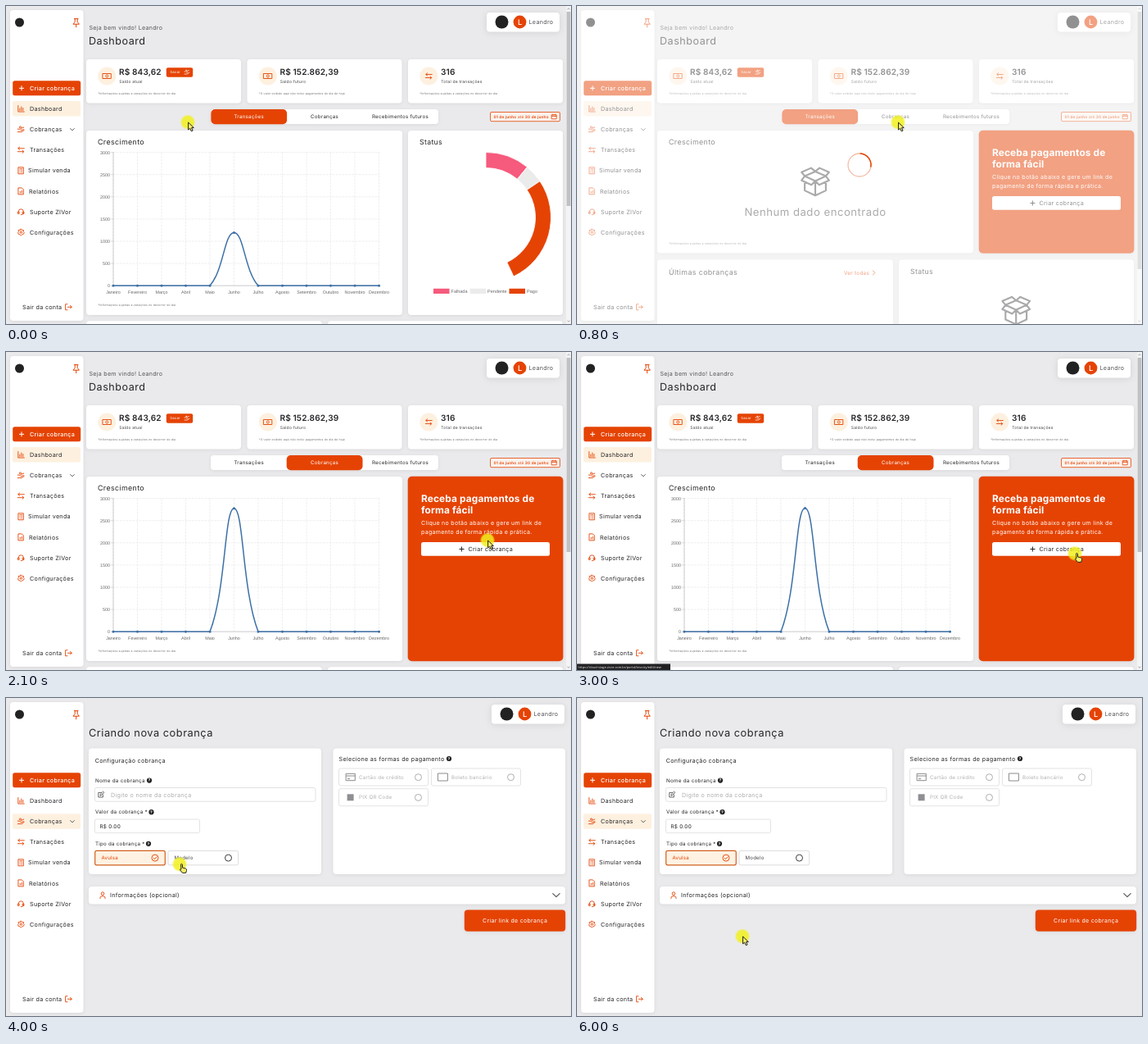
An HTML page for the animation above (6.2 s loop, 690 px wide and 388 px high).

```html
<!DOCTYPE html>
<html lang="pt-BR">
<head>
<meta charset="utf-8">
<title>Painel de cobranças</title>
<style>
html, body { margin: 0; width: 100%; height: 100%; overflow: hidden; background: #eaeaec; }
svg { display: block; width: 690px; height: 388px; }
text { font-family: Inter, "Open Sans", sans-serif; letter-spacing: .04em; white-space: pre; text-rendering: geometricPrecision; }
.big { letter-spacing: .01em; }
.axis { font-family: "Liberation Sans", Arial, sans-serif; letter-spacing: 0; }
.url { font-family: "Open Sans", sans-serif; letter-spacing: 0; }
.card { filter: drop-shadow(0 1px 2px rgba(0, 0, 0, .07)); }
.float { filter: drop-shadow(0 1px 4px rgba(0, 0, 0, .1)); }
</style>
</head>
<body>
<svg id="stage" viewBox="0 0 690 388"></svg>
<script>
const LOOP = 6200, STEP = 100;
const ORANGE = '#e54304', DARK = '#26262a', GREY = '#55555a', CREAM = '#fdf0df', BLUE = '#3d70a6';
const USER = 'Leandro', BRAND = 'ZIVor';

// ---- markup helpers ----
const text = (x, y, size, str, fill = DARK, more = '') =>
  `<text x="${x}" y="${y}" font-size="${size}" fill="${fill}" ${more}>${str}</text>`;
const rect = (x, y, x2, y2, r, fill = '#fff', more = '') =>
  `<rect x="${x}" y="${y}" width="${x2 - x}" height="${y2 - y}" rx="${r}" fill="${fill}" ${more}/>`;
const card = (x, y, x2, y2, more = '') => rect(x, y, x2, y2, 4, '#fff', 'class="card" ' + more);
const circle = (x, y, r, fill, more = '') => `<circle cx="${x}" cy="${y}" r="${r}" fill="${fill}" ${more}/>`;
const ring = (x, y, r, c = ORANGE, w = .9) => circle(x, y, r, 'none', `stroke="${c}" stroke-width="${w}"`);
const line = (d, stroke = ORANGE, w = .9, more = '') =>
  `<path d="${d}" fill="none" stroke="${stroke}" stroke-width="${w}" stroke-linecap="round" stroke-linejoin="round" ${more}/>`;
const group = (id, body) => `<g id="${id}">${body}</g>`;
const at = (x, y, body, scale = 1) => `<g transform="translate(${x} ${y}) scale(${scale})">${body}</g>`;
const plus = (x, y, c) => line(`M${x - 2.6} ${y}h5.2M${x} ${y - 2.6}v5.2`, c, 1);
const MID = 'text-anchor="middle"';
const NOTE = '*Informações sujeitas a variações no decorrer do dia';
const note = (x, y, str = NOTE) => text(x, y, 3.5, str, '#707074');

// icons live in an 8 x 8 box
const icon = {
  bars: line('M.5 0V7.5H8M2.5 6V3.5M4.5 6V1.5M6.5 6V3'),
  hand: line('M0 3.5H2L4 5H5.5M0 7H5L8 4.6L6.5 4L5 5.2M4.2 2.8L7.4 1.4') + ring(3.2, 1.3, 1.1),
  swap: line('M8 2H.5L2.3 .3M.5 2L2.3 3.7M0 6H7.5L5.7 4.3M7.5 6L5.7 7.7'),
  calc: line('M1 0H7V8H1ZM2.5 2H5.5M2.6 4h.1M4 4h.1M5.4 4h.1M2.6 6h.1M4 6h.1M5.4 6h.1'),
  doc: line('M1 0H5L7 2V8H1ZM3 6.2V4.5M5 6.2V3.5'),
  headset: line('M1 4.6V3.8a3 3 0 0 1 6 0V6.5L5 7.6H4M.4 4.2H1.8V6.4H.4ZM6.2 4.2H7.6V6.4H6.2Z'),
  gear: ring(4, 4, 1.2) +
    line('M4 0L5 1.2L7.2 1.4L7 3.4L7.9 4.6L6.8 6.4L5.2 6.8L4 8L2.8 6.8L1 6.4L.3 4.6L1 3.4L.8 1.4L3 1.2Z'),
  cash: line('M-1 1H9V7H-1Z') + ring(4, 4, 1.5),
  box: line('M1 2.4L4 1.1L7 2.4L4 3.8ZM1 2.4L.1 1.3L2.8 .1L4 1.1L5.2 .1L7.9 1.3L7 2.4M1 2.4L.1 3.6L2.9 4.9L4 3.8L5.1 4.9L7.9 3.6L7 2.4' +
    'M1 4.1V6.5L4 7.9L7 6.5V4.1M4 3.8V7.9', GREY, .5)
};

// ---- sidebar ----
const NAV = [['bars', 'Dashboard', 29], ['hand', 'Cobranças', 29], ['swap', 'Transações', 29], ['calc', 'Simular venda', 27],
  ['doc', 'Relatórios', 28], ['headset', 'Suporte ' + BRAND, 29], ['gear', 'Configurações', 29]];
const sidebar = card(5, 5, 94.5, 384) + circle(16.5, 20, 5.5, '#222') +
  line('M83.4 15.6h4.6M84.2 15.8v3.6L82 22.2h7.4L87.2 19.4v-3.6M85.7 22.4v3.4', ORANGE, 1) +
  rect(8.2, 91.2, 91.2, 109.2, 2.5, ORANGE) + plus(19, 100.3, '#fff') +
  text(29, 102.9, 7.2, 'Criar cobrança', '#fff', 'font-weight="500"') +
  rect(8, 116, 91, 134.5, 2, CREAM, 'id="active"') +
  NAV.map(([name, label, x], i) => {
    const y = 125.5 + i * 25.1;
    return at(14.3, y - 4, icon[name]) + text(x, y + 2.6, 7.2, label);
  }).join('') +
  line('M78.6 149.6l2.4 2.2l2.4-2.2', GREY) +
  text(20, 370, 7.2, 'Sair da conta') + line('M75 363.8h-2.4v7H75M75.4 367.3h4.8l-1.8-1.9m1.8 1.9l-1.8 1.9');

const user = rect(587, 8, 676, 31.5, 4, '#fff', 'class="float"') + circle(605.5, 19.5, 8, '#222') + circle(627.5, 19.5, 7.9, ORANGE) +
  text(627.7, 22.9, 9.2, USER[0], '#fff', MID + ' font-weight="500"') + text(638.5, 22.1, 7.2, USER, GREY);

// ---- dashboard ----
function stat(x, glyph, value, label, foot) {
  return card(x, 65, x + 189, 118.5) + circle(x + 25.3, 85.5, 11, CREAM) + at(x + 21.3, 81.5, icon[glyph]) +
    text(x + 40, 84.1, 10.1, value, DARK, 'class="big" font-weight="600"') +
    text(x + 40.3, 94, 5, label, '#444448') + note(x + 14.3, 107.6, foot);
}
const stats = stat(98, 'cash', 'R$ 843,62', 'Saldo atual') +
  stat(294.5, 'cash', 'R$ 152.862,39', 'Saldo futuro', '*O valor exibido aqui não inclui pagamentos do dia de hoje') +
  stat(491, 'swap', '316', 'Total de transações') +
  rect(195.8, 75.3, 228.2, 86.7, 2, ORANGE) + text(200.3, 82.4, 4.3, 'Sacar', '#fff') +
  line('M218 80h1.5l1.5 1.2h1M218 83h3.6l2.4-1.9M221 79.5l2.4-1', '#fff', .7) + circle(220.2, 78.6, .8, '#fff');

const TABS = ['Transações', 'Cobranças', 'Recebimentos futuros'];
const tabs = card(250, 126, 528, 144) + rect(250.3, 126, 343.1, 144.2, 5, ORANGE, 'id="tab"') +
  TABS.map((s, i) => text(296.7 + i * 92.4, 137.4, 6.2, s, DARK, `${MID} id="tab${i}"`)).join('');
const dates = rect(591.5, 129.5, 676.5, 140.7, 1.5, '#faf3ee', `stroke="${ORANGE}" stroke-width=".8"`) +
  text(595.5, 136.9, 4.7, '<tspan font-weight="600">01 de junho</tspan> até <tspan font-weight="600">30 de junho</tspan>', ORANGE) +
  line('M666.6 132.8h5.6v5h-5.6zM666.6 134.4h5.6M668 132v1M670.8 132v1', ORANGE, .8);

const MONTHS = 'Janeiro Fevereiro Março Abril Maio Junho Julho Agosto Setembro Outubro Novembro Dezembro'.split(' ');
const X0 = 131, Y0 = 341.2, DX = 29.5, PX = 162.6 / 3000, PEAK = 2780;
const mx = i => X0 + i * DX;
let grid = '';
for (let v = 0; v <= 3000; v += 500) {
  const y = Y0 - v * PX;
  grid += line(`M128 ${y}H${X0}`, '#c4c4c6', .6) + line(`M${X0} ${y}H456`, '#e2e2e4', .6, 'stroke-dasharray="2 2"') +
    text(127, y + 1.9, 5.4, v, '#666', 'class="axis" text-anchor="end"');
}
grid += MONTHS.map((m, i) => line(`M${mx(i)} ${Y0}V178.6`, '#e2e2e4', .6, 'stroke-dasharray="2 2"') +
  text(mx(i), 350.8, 5.4, m, '#666', 'class="axis" ' + MID)).join('') + line(`M${X0} 178.6V${Y0}H456`, '#b4b4b8', .6);
const chart = grid + line('', BLUE, 1.5, 'id="curve"') +
  MONTHS.map((m, i) => circle(mx(i), Y0, 1.5, BLUE, i === 5 ? 'id="peak"' : '')).join('') + note(112.3, 366);

const SLICES = [['#f65a7c', .255, 'Falhada', 522], ['#ebebeb', .108, 'Pendente', 566.5], [ORANGE, .637, 'Pago', 614.5]];
const donut = card(491, 152, 680, 377) + text(505, 169, 8.7, 'Status') +
  SLICES.map(([c, f, name, x], i) => `<path id="slice${i}" fill="${c}" stroke="#fff" stroke-width=".8"/>` +
    rect(x, 344.8, x + 19.5, 351, 0, c) + text(x + 21.6, 350, 5.5, name, '#666', 'class="axis"')).join('');

const promo = rect(490.7, 151.7, 680.4, 377, 5, ORANGE, 'id="promoBox" class="card"') +
  text(507, 183, 11.9, 'Receba pagamentos de', '#fff', 'class="big" font-weight="700"') +
  text(507, 197, 11.9, 'forma fácil', '#fff', 'class="big" font-weight="700"') +
  text(507, 211.3, 7.05, 'Clique no botão abaixo e gere um link de', '#fff') +
  text(507, 222, 7.05, 'pagamento de forma rápida e prática.', '#fff') +
  rect(507, 232, 664, 248.8, 2.5) + plus(556.5, 240.5, DARK) + text(564.5, 243.1, 7.2, 'Criar cobrança');

const empty = at(273.8, 197.2, icon.box, 4.3) + text(291, 255.6, 13.1, 'Nenhum dado encontrado', GREY, MID) + note(112.3, 291.3);
const row2 = card(98, 0, 386, 110) + card(393, 0, 680, 110) +
  text(112, 18.8, 8.9, 'Últimas cobranças') + text(326, 18.2, 6.4, 'Ver todas', ORANGE) + line('M361.4 13.4l2.4 2.6l-2.4 2.6', ORANGE, 1) +
  text(407, 17.5, 8.7, 'Status') + at(519, 45, icon.box, 4.3);

const dash = text(101.5, 28.8, 7.1, `Seja bem vindo! ${USER}`, GREY) + text(101, 46.8, 12.6, 'Dashboard') +
  stats + tabs + dates + card(98, 152, 484, 377, 'id="chartBox"') + text(112, 169, 8.9, 'Crescimento') +
  group('chart', chart) + group('donut', donut) + group('promo', promo) + group('empty', empty) + group('row2', row2) +
  rect(684, 0, 690, 388, 0, '#f4f4f5') + rect(684.6, 7, 689.4, 244, 0, '#c1c1c3', 'id="thumb"') +
  line('M685.8 4l1.2-1.4l1.2 1.4M685.8 384l1.2 1.4l1.2-1.4', '#88888c', .7);

// ---- new charge form ----
const help = (x, y) => circle(x, y, 3.1, '#222226') + text(x + .1, y + 1.8, 5, '?', '#fff', MID + ' font-weight="700"');
const field = (x, y, x2, y2, c = '#dcdcdf', fill = '#fff', w = .8) => rect(x, y, x2, y2, 2, fill, `stroke="${c}" stroke-width="${w}"`);
const method = (x, y, label) => field(x, y, x + 109, y + 21) + text(x + 24.5, y + 12.6, 6.2, label, '#b0b0b4') + ring(x + 97, y + 10.7, 4, '#a4a4a8');
const form = text(101, 46.8, 12.8, 'Criando nova cobrança') +
  card(101, 61.5, 385, 215) + text(108.7, 79.3, 7.2, 'Configuração cobrança') +
  text(109, 102.8, 6.3, 'Nome da cobrança') + help(175, 100.6) + field(108.5, 109.5, 378, 126.2) +
  line('M116.4 115.4h-3.6v5.6h5.6v-3M115 118.8l.2-1.4l3.4-3.4l1.2 1.2l-3.4 3.4z', '#444448', .8) +
  text(128, 120.6, 7.2, 'Digite o nome da cobrança', '#aeaeb2') +
  text(109, 141.3, 6.3, 'Valor da cobrança *') + help(177.5, 139.2) + field(108.5, 148, 236.5, 164.6) + text(114.5, 158.8, 6.4, 'R$ 0.00') +
  text(109, 179.9, 6.2, 'Tipo da cobrança *') + help(174, 177.8) +
  field(108.7, 186.4, 194.3, 203.8, '#d2601f', '#fff2e2', 1.2) + text(116.5, 197, 6.1, 'Avulsa', ORANGE) +
  ring(182, 195.1, 4) + line('M180.2 195.2l1.4 1.4l2.4-2.7') +
  field(198, 186.4, 283.6, 203.8, '#d4d4d8') + text(205.5, 197, 6.1, 'Modelo', '#444448') + ring(271.5, 195.1, 4, DARK) +
  card(399.5, 61.5, 683, 215) + text(406.5, 76.5, 7.2, 'Selecione as formas de pagamento') + help(541, 74) +
  method(406.5, 86, 'Cartão de crédito') + method(519.5, 86, 'Boleto bancário') + method(406.5, 110.7, 'PIX QR Code') +
  line('M415.5 92.3h10.8v8.4h-10.8zM415.5 95h10.8M417.4 98.6h2.4', '#8a8a8e', 1) +
  line('M527.8 92h11.6v9h-11.6z', '#8a8a8e', 1) + rect(416.6, 117.3, 424.6, 125.3, 0, '#8f8f93') +
  card(101, 230, 683, 251.6) + ring(118, 238.6, 1.8) +
  line('M115 244.6v-.8a2 2 0 0 1 2-2h2a2 2 0 0 1 2 2v.8') +
  text(127, 243.3, 7.2, 'Informações (opcional)') + line('M667.8 238.6l4.2 4l4.2-4', GREY, 1.2) +
  rect(559.8, 258.5, 683.2, 284.8, 4, ORANGE, 'class="card"') + text(621.6, 274, 7, 'Criar link de cobrança', '#fff', MID);

const loader = rect(0, 0, 690, 388, 0, '#fff', 'opacity=".5"') + ring(345, 194, 14, '#f3bda6', 1.3) +
  line('M346.2 180.05A14 14 0 0 1 358.9 196', ORANGE, 1.5, 'id="spin"');

const url = rect(0, 380.5, 114, 388, 0, '#222224') +
  text(1.5, 385.8, 3.9, `https://cloud-stage.${BRAND.toLowerCase()}.com.br/portal/invoicy/edit/new`, '#eee', 'class="url"');

const skin = 'fill="#f6ee6a" stroke="#222" stroke-width="1" stroke-linejoin="round"';
const cursor = `<radialGradient id="glow"><stop offset=".75" stop-color="#f1f01e" stop-opacity=".85"/>
  <stop offset="1" stop-color="#f1f01e" stop-opacity=".1"/></radialGradient>` + circle(0, -.3, 9.2, 'url(#glow)') +
  `<path id="arrow" d="M.6 0V9L2.7 7.2L4.3 10.8L6.1 10L4.6 6.6H7.4Z" ${skin}/>` +
  `<path id="point" d="M1.7-.2Q2.7-1.2 3.5 .2V4L7.5 5.1Q8.9 5.6 8.5 7.4L7.7 10.4H3.5L.5 6.8Q.5 5.2 1.9 6Z" ${skin}/>`;

document.getElementById('stage').innerHTML = rect(0, 0, 690, 388, 0, '#eaeaec') + sidebar +
  group('dash', dash) + group('form', form) + group('user', user) +
  group('loader', loader) + group('url', url) + group('cursor', cursor);

// ---- motion ----
const $ = id => document.getElementById(id);
const set = (id, attrs) => { for (const k in attrs) $(id).setAttribute(k, attrs[k]); };
const show = (id, on) => { $(id).style.display = on ? '' : 'none'; };

const LOAD = 800, READY = 1300, OPEN = 3200;
const PATH = [[0, 222, 142], [700, 392, 142], [1400, 391, 143], [1500, 391, 143], [2100, 588, 230], [2500, 612, 248],
  [2800, 608, 246], [3600, 608, 246], [3800, 570, 236], [4000, 212, 203], [4250, 160, 194], [4500, 168, 224],
  [4700, 212, 220], [4900, 229, 196], [5200, 231, 197], [5500, 202, 291], [LOOP, 202, 291]];

function pointer(t) {
  const i = PATH.findIndex(p => p[0] > t);
  const [a, x, y] = PATH[i - 1], [b, x2, y2] = PATH[i];
  const u = (t - a) / (b - a), e = u * u * (3 - 2 * u);
  return [x + (x2 - x) * e, y + (y2 - y) * e];
}

function slice(a, b) {
  const p = (r, q) => `${586 + r * Math.sin(q)} ${258 - r * Math.cos(q)}`;
  const big = b - a > Math.PI ? 1 : 0;
  return `M${p(79.5, a)}A79.5 79.5 0 ${big} 1 ${p(79.5, b)}L${p(60.5, b)}A60.5 60.5 0 ${big} 0 ${p(60.5, a)}Z`;
}

// spline with tension .4, held at the baseline on both sides of the peak
function curve(h) {
  const a = mx(4), b = mx(5), c = mx(6), top = Y0 - h, d = Math.hypot(DX, h);
  const f = .4 * d / (DX + d), out = 2 * DX * f, y = Y0 - h * f, flat = .4 * DX;
  return `M${X0} ${Y0}H${a}C${a + out} ${y} ${b - flat} ${top} ${b} ${top}S${c - out} ${y} ${c} ${Y0}H456`;
}

function drawCharts(grow) {
  const h = PEAK * PX * grow;
  set('curve', { d: curve(h) });
  set('peak', { cy: Y0 - h });
  let from = 0;
  SLICES.forEach(([, part], i) => {
    const to = from + part * grow * Math.PI * 2;
    set('slice' + i, { d: slice(from, to) });
    from = to;
  });
}

function draw(t) {
  const loading = t >= LOAD && t < READY, form = t >= OPEN, promo = t >= LOAD, tab = t >= READY ? 1 : 0;
  const [x, y] = pointer(t);
  const over = (x1, y1, x2, y2) => x > x1 && x < x2 && y > y1 && y < y2;
  const onButton = !form && promo && over(507, 232, 664, 249);
  const hand = !loading && (form ? over(108, 186, 284, 204) : onButton || over(250, 126, 528, 144));

  show('dash', !form);
  show('form', form);
  set('user', { transform: `translate(${form ? 6 : 0} 0)` });
  set('active', { y: form ? 141.3 : 116 });

  const left = t < LOAD ? t + 131 : t - READY + 31;
  drawCharts(1 - (1 - Math.min(1, Math.max(0, left / 1000))) ** 4);
  show('chart', !loading);
  show('donut', !promo);
  show('promo', promo);
  show('empty', loading);
  const height = loading ? 149.5 : 225;
  set('chartBox', { height });
  set('promoBox', { height: height + .6 });
  set('row2', { transform: `translate(0 ${loading ? 309.5 : 384.3})` });
  set('thumb', { height: loading ? 314 : 237 });
  set('tab', { x: 250.3 + tab * 92.4 });
  TABS.forEach((s, i) => set('tab' + i, { fill: i === tab ? '#fff' : DARK }));

  show('loader', loading);
  set('spin', { transform: `rotate(${(t - LOAD) * .36} 345 194)` });
  show('url', onButton);
  set('cursor', { transform: `translate(${x} ${y})` });
  show('arrow', !hand);
  show('point', hand);
}

function tick() {
  draw(Math.floor(performance.now() % LOOP / STEP) * STEP);
  requestAnimationFrame(tick);
}
tick();
</script>
</body>
</html>
```
